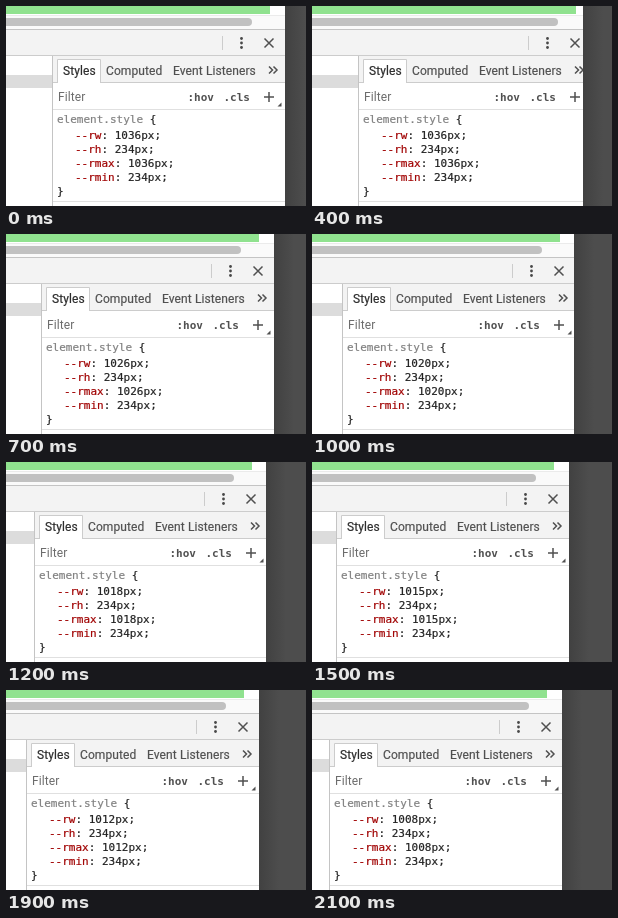
An HTML page that plays this animation: 300x200 px, repeating every 2.2 s.

```html
<!DOCTYPE html>
<html lang="en">
<head>
<meta charset="utf-8">
<title>Styles pane while resizing</title>
<style>
  html, body { margin: 0; width: 100%; height: 100%; overflow: hidden; background: #fff; }
  svg { display: block; width: 300px; height: 200px; }
  text { white-space: pre; stroke-width: .2; }
  .ui { font: 12px Roboto, sans-serif; letter-spacing: .1px; fill: #505050; stroke: #505050; }
  .ui.on { fill: #2c2c2c; stroke: #2c2c2c; }
  .ui.hint { fill: #6c6c6c; stroke: none; }
  .code { font: 11px "DejaVu Sans Mono", monospace; fill: #222; stroke: #222; }
  .name { fill: #a00000; stroke: #a00000; }
  .dim { fill: #808080; stroke: #808080; }
  .toggle { font-weight: bold; fill: #505050; stroke: none; }
  .icon { fill: none; stroke: #505050; stroke-width: 1.5; }
</style>
</head>
<body>
<svg viewBox="0 0 300 200">
  <defs>
    <linearGradient id="shade">
      <stop offset="0" stop-color="#414141"/>
      <stop offset="1" stop-color="#4d4d4d"/>
    </linearGradient>
  </defs>

  <g id="win">
    <!-- page and scrollbar -->
    <rect width="340" height="200" fill="#fff"/>
    <rect width="264" height="8" fill="#90e28f"/>
    <rect y="10" width="340" height="13" fill="#fafafa"/>
    <rect y="9" width="340" height="1" fill="#ebebeb"/>
    <rect x="-20" y="12" width="266" height="8" rx="4" fill="#c1c1c1"/>

    <!-- toolbar -->
    <rect y="23" width="340" height="27" fill="#f3f3f3"/>
    <rect y="23" width="340" height="1" fill="#c4c4c4"/>
    <rect y="49" width="340" height="1" fill="#ccc"/>
    <rect x="216" y="30" width="1" height="14" fill="#ccc"/>
    <g fill="#484848">
      <circle cx="235.5" cy="32.5" r="1.4"/>
      <circle cx="235.5" cy="37" r="1.4"/>
      <circle cx="235.5" cy="41.5" r="1.4"/>
    </g>
    <path class="icon" d="M258.5 32.5l9 9m0-9l-9 9"/>

    <!-- tree row and tabs -->
    <rect y="69" width="46" height="13" fill="#dcdcdc"/>
    <rect x="46" y="50" width="294" height="27" fill="#f3f3f3"/>
    <rect x="46" y="76" width="294" height="1" fill="#ccc"/>
    <path d="M51.5 77V53.500H94.500V77" fill="#fff" stroke="#ccc"/>
    <rect x="46" y="50" width="1" height="150" fill="#c4c4c4"/>
    <text class="ui on" x="57" y="69">Styles</text>
    <text class="ui" x="100" y="69">Computed</text>
    <text class="ui" x="167" y="69">Event Listeners</text>
    <path class="icon" d="M263 60.500l3.500 3.500-3.500 3.500m4.500-7l3.500 3.500-3.500 3.500"/>

    <!-- filter row -->
    <text class="ui hint" x="52" y="95">Filter</text>
    <text class="code toggle" x="181.500" y="95">:hov</text>
    <text class="code toggle" x="217.500" y="95">.cls</text>
    <path class="icon" d="M258 91h10m-5-5v10"/>
    <path d="M275.500 96.500v4h-4z" fill="#505050"/>
    <rect x="47" y="103" width="293" height="1" fill="#e0e0e0"/>

    <!-- rule -->
    <text class="code" x="51" y="117"><tspan class="dim">element.style</tspan> {</text>
    <g id="props"></g>
    <text class="code" x="51" y="188.500">}</text>
    <rect x="47" y="195" width="293" height="1" fill="#e0e0e0"/>
    <text class="code" x="51" y="207.500">.grad {</text>
  </g>

  <g id="desk">
    <rect width="20" height="200" fill="url(#shade)"/>
    <rect x="20" width="60" height="200" fill="#4d4d4d"/>
  </g>
</svg>
<script>
  const LOOP = 2200, HOLD = 400, STEP = 100;
  // pane shift, window edge, shown width
  const start = [0, 279, 1036];
  const steps = [
    [0, 271, 1036], [-8, 270, 1028], [-9, 269, 1027],
    [-11, 268, 1026], [-12, 266, 1024], [-13, 264, 1023],
    [-16, 262, 1020], [-17, 261, 1019], [-18, 260, 1018],
    [-20, 259, 1017], [-21, 258, 1016], [-22, 257, 1015],
    [-23, 256, 1014], [-24, 255, 1014], [-25, 254, 1013],
    [-26, 253, 1012], [-27, 252, 1010], [-29, 250, 1008]
  ];
  const $ = id => document.getElementById(id);

  $("props").innerHTML = ["rw", "rh", "rmax", "rmin"].map((name, i) =>
    `<text class="code" x="69" y="${133 + 14 * i}"><tspan class="name">--${name}</tspan>: <tspan id="${name}">234px</tspan>;</text>`
  ).join("");

  function draw(now) {
    const t = now % LOOP;
    const [shift, edge, width] = t < HOLD ? start : steps[Math.floor((t - HOLD) / STEP)];
    $("win").setAttribute("transform", `translate(${shift})`);
    $("desk").setAttribute("transform", `translate(${edge})`);
    $("rw").textContent = $("rmax").textContent = width + "px";
  }

  let origin;
  function tick(now) {
    origin ??= now;
    draw(Math.max(0, now - origin));
    requestAnimationFrame(tick);
  }
  draw(0);
  requestAnimationFrame(tick);
</script>
</body>
</html>
```
